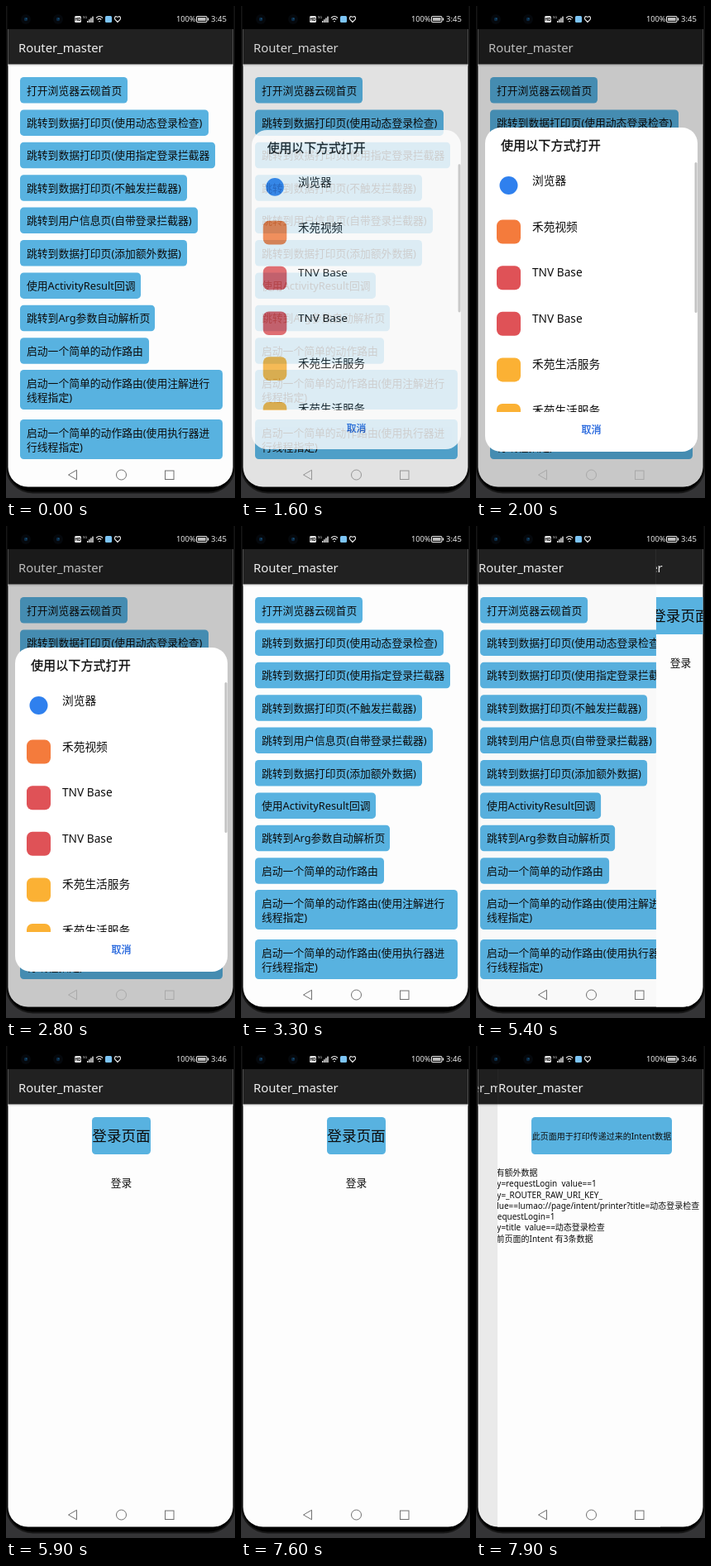
An HTML page for the animation above (8000 ms loop, 277 px wide and 595 px high).

```html
<!DOCTYPE html>
<html lang="zh-CN">
<head>
<meta charset="utf-8">
<title>Router_master</title>
<style>
  html, body { margin: 0; width: 100%; height: 100%; overflow: hidden; background: #000; }
  svg { display: block; width: 277px; height: 595px; }
  text { font-family: "Noto Sans", "Noto Sans CJK SC", "Noto Sans CJK", sans-serif; white-space: pre; }
</style>
</head>
<body>
<svg id="stage" viewBox="0 0 277 595" xmlns="http://www.w3.org/2000/svg"></svg>
<script>
const LOOP = 8000, STEP = 100;
const LEFT = 2, TOP = 28, WIDTH = 273, BOTTOM = 582;
const BLUE = '#58b2e0';

// [time, dim, dialog opacity]
const DIALOG = [
  [0, 0, 0], [1600, .5, .8], [1800, .85, .96], [1900, 1, 1],
  [2900, .85, .75], [3000, .5, .32], [3100, .2, .08], [3200, .05, 0], [3300, 0, 0]
];
// [time, progress] of each page sliding in
const LOGIN_IN = [[0, 0], [5400, .209], [5500, .66], [5600, .9], [5700, .975], [5800, .995], [5900, 1]];
const PRINTER_IN = [[0, 0], [7800, .66], [7900, .912]];
const CLOCK = [[0, '3:45'], [5700, '3:46']];

const stage = document.getElementById('stage');

function add(parent, tag, attrs = {}, content) {
  const el = document.createElementNS('http://www.w3.org/2000/svg', tag);
  for (const key in attrs) el.setAttribute(key, attrs[key]);
  if (content !== undefined) el.textContent = content;
  parent.appendChild(el);
  return el;
}

const rect = (parent, x, y, width, height, fill, rx = 0) =>
  add(parent, 'rect', { x, y, width, height, fill, rx });

// cy is the middle of the line
const text = (parent, x, cy, size, content, attrs = {}) =>
  add(parent, 'text', { x, y: cy + size * .36, 'font-size': size, fill: '#0c0c0c', ...attrs }, content);

// A thin outline gives a medium weight
const medium = color => ({ fill: color, stroke: color, 'stroke-width': .3 });

function clip(id, x, y, width, height, rx = 0) {
  return rect(add(stage, 'clipPath', { id }), x, y, width, height, '#000', rx);
}

function drawPhone() {
  rect(stage, 0, 0, 277, 595, '#343436');
  add(stage, 'rect', { x: .5, y: -30, width: 276, height: 618.5, rx: 32, fill: '#000', stroke: '#161616', 'stroke-width': 2 });
}

function addPage(parent, id) {
  const clipRect = clip(id, LEFT, TOP, WIDTH, BOTTOM - TOP);
  const root = add(parent, 'g', { 'clip-path': `url(#${id})` });
  const body = add(root, 'g');
  rect(body, LEFT, TOP, WIDTH, BOTTOM - TOP, '#fdfdfd');
  rect(body, LEFT, 70, WIDTH, 1, '#8a8a8a');
  rect(body, LEFT, 71, WIDTH, 1.5, '#e4e4e4');
  rect(body, LEFT, TOP, WIDTH, 42, '#212121');
  text(body, 15, 50.6, 14.8, 'Router_master', { fill: '#f0f0f0' });
  const shade = rect(root, LEFT, TOP, WIDTH, BOTTOM - TOP, '#000');
  return { root, body, shade, clipRect };
}

function fillHome(body) {
  const singles = [
    [130, '打开浏览器云砚首页'],
    [228, '跳转到数据打印页(使用动态登录检查)'],
    [236, '跳转到数据打印页(使用指定登录拦截器'],
    [202, '跳转到数据打印页(不触发拦截器)'],
    [215, '跳转到用户信息页(自带登录拦截器)'],
    [202, '跳转到数据打印页(添加额外数据)'],
    [146, '使用ActivityResult回调'],
    [163, '跳转到Arg参数自动解析页'],
    [156, '启动一个简单的动作路由']
  ];
  singles.forEach(([width, label], i) => {
    const y = 86 + 39.4 * i;
    rect(body, 17, y, width, 31.5, BLUE, 4.5);
    text(body, 25, y + 16, 12.8, label);
  });
  const doubles = [
    [440, '启动一个简单的动作路由(使用注解进行', '线程指定)'],
    [500, '启动一个简单的动作路由(使用执行器进', '行线程指定)']
  ];
  for (const [y, first, second] of doubles) {
    rect(body, 17, y, 245, 48, BLUE, 4.5);
    text(body, 25, y + 16.5, 12.8, first);
    text(body, 25, y + 33.5, 12.8, second);
  }
}

function fillLogin(body) {
  rect(body, 104, 86, 71, 45, BLUE, 4.5);
  text(body, 139.5, 109, 17.6, '登录页面', { 'text-anchor': 'middle' });
  text(body, 139.5, 165, 12.7, '登录', { 'text-anchor': 'middle' });
}

function fillPrinter(body) {
  rect(body, 55, 86, 170, 45, BLUE, 4.5);
  text(body, 140, 109, 10, '此页面用于打印传递过来的Intent数据', { 'text-anchor': 'middle' });
  [
    '所有额外数据',
    'key=requestLogin  value==1',
    'key=_ROUTER_RAW_URI_KEY_',
    'value==lumao://page/intent/printer?title=动态登录检查',
    '&requestLogin=1',
    'key=title  value==动态登录检查',
    '当前页面的Intent 有3条数据'
  ].forEach((line, i) => text(body, 2.5, 153.3 + 13.3 * i, 10, line));
}

function drawNav(parent) {
  const nav = add(parent, 'g', { fill: 'none', stroke: '#707070' });
  add(nav, 'path', { d: 'M75.5 567L85.5 561.2V572.8Z', 'stroke-linejoin': 'round' });
  add(nav, 'circle', { cx: 139.5, cy: 567, r: 6 });
  add(nav, 'rect', { x: 192.5, y: 562, width: 10.5, height: 10.5 });
  return nav;
}

function drawDialog(parent) {
  const box = add(parent, 'g');
  rect(box, 11, 147, 257, 392, '#fff', 19);
  text(box, 30, 169, 15.1, '使用以下方式打开', medium('#0c0c0c'));
  clip('list', 11, 188, 257, 303);
  const list = add(box, 'g', { 'clip-path': 'url(#list)' });
  const apps = [
    ['浏览器', '#2f80ee'],
    ['禾苑视频', '#f47b3c'],
    ['TNV Base', '#df5257'],
    ['TNV Base', '#df5257'],
    ['禾苑生活服务', '#fbb134'],
    ['禾苑生活服务', '#fbb134']
  ];
  apps.forEach(([name, color], i) => {
    const y = 211 + 55.6 * i;
    if (i) rect(list, 25, y - 8, 29, 29, color, 7);
    else add(list, 'circle', { cx: 39.5, cy: y + 6, r: 11, fill: color });
    text(list, 68, y, 13.7, name);
  });
  rect(box, 264.5, 189, 3, 182, '#c4c4c4', 1.5);
  text(box, 139.5, 513, 12, '取消', { 'text-anchor': 'middle', ...medium('#1f62dc') });
  return box;
}

function drawStatus() {
  const bar = add(stage, 'g');
  for (const x of [24, 63]) {
    add(bar, 'circle', { cx: x, cy: 16, r: 6, fill: '#05080c' });
    add(bar, 'circle', { cx: x, cy: 16, r: 2.2, fill: '#0b2c48' });
    add(bar, 'circle', { cx: x + .8, cy: 15.2, r: .8, fill: '#1d5a80' });
  }
  rect(bar, 83, 12, 8, 8, '#e4e4e4', 1.5);
  text(bar, 87, 16, 5, 'HD', { 'text-anchor': 'middle', fill: '#000', 'font-weight': 700 });
  text(bar, 93, 13.5, 4, '5G', { fill: '#ddd' });
  for (let i = 0; i < 4; i++) rect(bar, 98 + 2.1 * i, 18 - 1.8 * i, 1.4, 2 + 1.8 * i, '#eee');
  const lines = add(bar, 'g', { fill: 'none', stroke: '#eee', 'stroke-width': 1.1 });
  add(lines, 'path', { d: 'M109 14.5Q113 10.5 117 14.5M110.7 16.5Q113 14.2 115.3 16.5M112.3 18.6H113.7' });
  rect(bar, 120, 12, 8, 8, '#7cc4f4', 1.5);
  add(lines, 'path', { d: 'M135 19.5L131.8 16.2Q130.8 13.2 133 12.6L135 13.4L137 12.6Q139.2 13.2 138.2 16.2Z' });
  text(bar, 206, 16, 9.2, '100%', { fill: '#eee' });
  add(lines, 'rect', { x: 230.5, y: 12.5, width: 12.5, height: 7, rx: 1.5 });
  rect(bar, 232, 14, 9.5, 4, '#bbb', .5);
  rect(bar, 244, 14.5, 1.2, 3, '#eee');
  return text(bar, 248, 16, 9.5, '', { fill: '#eee' });
}

drawPhone();
clip('screen', LEFT + .5, 0, WIDTH - 1, BOTTOM - .5, 24);
const screen = add(stage, 'g', { 'clip-path': 'url(#screen)' });
const pages = ['home', 'login', 'printer'].map(id => addPage(screen, id));
[fillHome, fillLogin, fillPrinter].forEach((fill, i) => fill(pages[i].body));
const dim = rect(screen, LEFT, TOP, WIDTH, BOTTOM - TOP, '#000');
const nav = drawNav(screen);
const dialog = drawDialog(screen);
const clock = drawStatus();

const at = (table, t) => table.filter(row => row[0] <= t).pop();

// A page is uncovered from the right while the one below drifts left.
function placePage(page, enter, leave) {
  const shift = WIDTH / 2 * (1 - enter) - 57 * leave;
  const hidden = WIDTH * (1 - enter);
  page.root.style.display = enter > 0 && leave < 1 ? '' : 'none';
  page.body.setAttribute('transform', `translate(${shift.toFixed(2)} 0)`);
  page.clipRect.setAttribute('x', LEFT + hidden);
  page.clipRect.setAttribute('width', WIDTH - hidden);
  page.shade.setAttribute('opacity', .08 * leave);
}

function render(t) {
  const login = at(LOGIN_IN, t)[1], printer = at(PRINTER_IN, t)[1];
  placePage(pages[0], 1, login);
  placePage(pages[1], login, printer);
  placePage(pages[2], printer, 0);

  const [, shade, alpha] = at(DIALOG, t);
  dim.setAttribute('opacity', .21 * shade);
  nav.setAttribute('opacity', 1 - .65 * shade);
  dialog.setAttribute('opacity', alpha);
  const scale = 1 - .075 * (1 - alpha);
  dialog.setAttribute('transform', `translate(139.5 343) scale(${scale}) translate(-139.5 -343)`);
  clock.textContent = at(CLOCK, t)[1];
}

const start = performance.now();
function tick(now) {
  const t = Math.max(0, now - start) % LOOP;
  render(Math.floor(t / STEP) * STEP);
  requestAnimationFrame(tick);
}
render(0);
requestAnimationFrame(tick);
</script>
</body>
</html>
```
